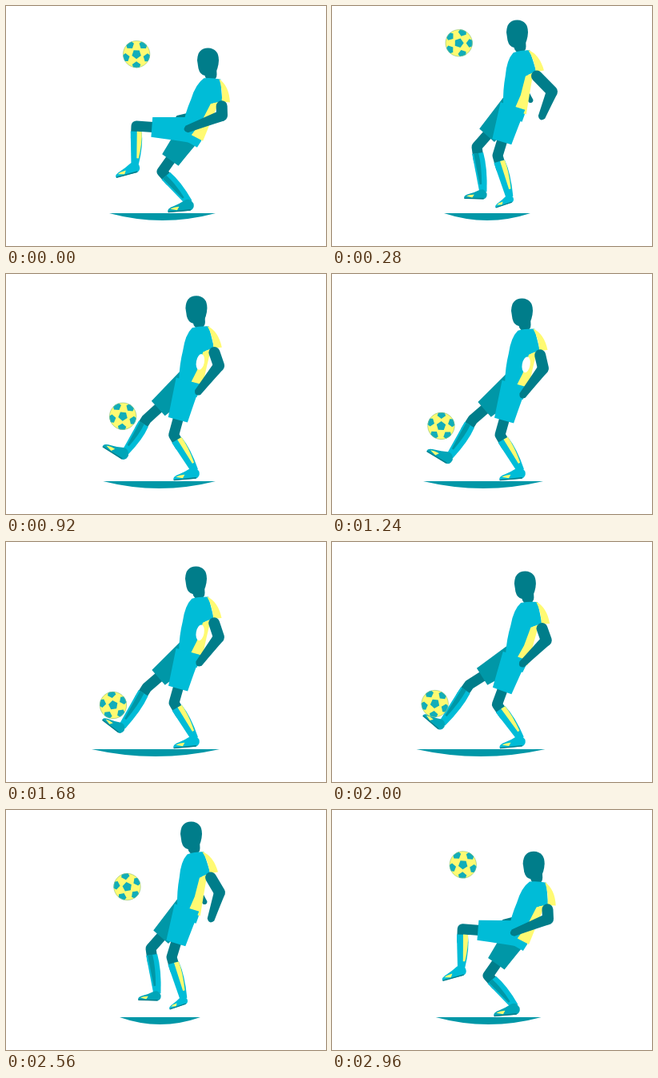
These frames come from a looping animation (400 by 300 pixels, 3000 ms). An HTML page:

```html
<!DOCTYPE html>
<html lang="en">
<head>
<meta charset="utf-8">
<title>Ball juggling</title>
<style>
  html, body { margin: 0; width: 100%; height: 100%; overflow: hidden; background: #fff; }
  svg { display: block; width: 100%; height: 100%; }
</style>
</head>
<body>
<svg id="stage" viewBox="0 0 400 300"></svg>
<script>
const CYAN = '#00bcd7', TEAL = '#0097a7', SKIN = '#007d8a', YELLOW = '#fffa72';
const FRAME = 40, FRAMES = 75;
const stage = document.getElementById('stage');

function add(tag, attrs, parent = stage) {
  const el = document.createElementNS('http://www.w3.org/2000/svg', tag);
  for (const key in attrs) el.setAttribute(key, attrs[key]);
  return parent.appendChild(el);
}
const shape = (fill, d = '', parent = stage) => add('path', { fill, d }, parent);
const bone = width => add('path', {
  fill: 'none', stroke: SKIN, 'stroke-width': width, 'stroke-linejoin': 'round', 'stroke-linecap': 'round'
});

// Joint order of every pose; the last pair is the left and right end of the shadow.
const JOINTS = ['waist', 'neck', 'elbow', 'hand', 'farHand', 'nearKnee', 'nearAnkle', 'nearToe',
  'farKnee', 'farAnkle', 'farToe', 'shadow'];
const pose = (...points) => Object.fromEntries(JOINTS.map((name, i) => [name, points[i]]));

const kneeUp = pose([232, 155], [256, 90], [270, 137], [226, 154], [214, 140],
  [163, 150], [161, 199], [137, 213], [195, 207], [229, 246], [202, 256], [129, 262]);
const airborne = pose([226, 122], [235, 52], [267, 103], [256, 137], [249, 116],
  [207, 184], [222, 236], [204, 248], [181, 173], [189, 230], [165, 236], [142, 243]);
const landing = pose([232, 155], [256, 89], [270, 136], [226, 153], [215, 140],
  [198, 210], [236, 246], [210, 256], [160, 164], [158, 215], [132, 223], [133, 259]);
const standing = pose([228, 137], [241, 68], [264, 118], [238, 152], [234, 125],
  [210, 201], [236, 246], [209, 256], [176, 182], [147, 228], [119, 220], [114, 264]);
const resting = { ...standing, elbow: [266, 119], hand: [241, 152],
  farAnkle: [145, 231], farToe: [121, 221], shadow: [107, 267] };
const kicking = pose([231, 157], [256, 91], [273, 134], [227, 156], [224, 142],
  [196, 209], [236, 246], [210, 256], [159, 168], [119, 212], [98, 197], [101, 265]);

const firstJump = Object.fromEntries(JOINTS.map(name =>
  [name, name === 'shadow' ? [140, 248] : [airborne[name][0], airborne[name][1] + 3]]));
firstJump.elbow = [275, 107];
firstJump.hand = [262, 139];
const stretching = { ...standing, waist: [228, 133], neck: [241, 64], elbow: [266, 114], hand: [240, 148],
  farAnkle: [149, 223], farToe: [121, 214], shadow: [121, 262] };
const reaching = { ...kicking, farAnkle: [117, 215], farToe: [95, 201] };
const kneeing = { ...kneeUp, waist: [231, 148], neck: [253, 82], elbow: [270, 130], hand: [229, 150],
  nearKnee: [165, 138], nearAnkle: [166, 189], nearToe: [143, 203], shadow: [135, 258] };

const KEYS = [[0, kneeUp], [7, firstJump], [14, landing], [24, stretching], [31, standing], [36, resting],
  [47, resting], [56, reaching], [57, kicking], [64, airborne], [70, kneeing], [75, kneeUp]];

// Ball contacts: frame, x, y, then the sideways and vertical curvature up to the next contact.
const BALL = [[-4.5, 166, 109, 0, 0.77], [19, 151, 198, 0, 0.55], [33, 134, 204, 0, 0], [47, 134, 204, 0, -0.15],
  [56, 118, 190, -0.135, 0.948], [70.5, 166, 109, 0, 0.77], [94, 151, 198, 0, 0]];

const mix = (a, b, k) => [a[0] + (b[0] - a[0]) * k, a[1] + (b[1] - a[1]) * k];
const shift = (p, n, k) => [p[0] + n[0] * k, p[1] + n[1] * k];
const num = p => p.map(v => v.toFixed(2)).join(' ');
const line = (...points) => 'M' + points.map(num).join('L');
const unit = (a, b) => {
  const length = Math.hypot(b[0] - a[0], b[1] - a[1]) || 1;
  return [(b[0] - a[0]) / length, (b[1] - a[1]) / length];
};
const rearOf = ([x, y]) => [y, -x];

// Tapered limb from a to b; bulge curves its rear edge outwards.
function limb(a, b, widthA, widthB, bulge = 0, tip = 0) {
  const along = unit(a, b), rear = rearOf(along);
  const belly = shift(mix(a, b, 0.4), rear, (widthA + widthB) / 4 + bulge);
  return 'M' + num(shift(a, rear, -widthA / 2)) + 'L' + num(shift(b, rear, -widthB / 2)) +
    'Q' + num(shift(b, along, tip)) + ' ' + num(shift(b, rear, widthB / 2)) +
    'Q' + num(belly) + ' ' + num(shift(a, rear, widthA / 2)) + 'Z';
}

function poseAt(frame) {
  const i = KEYS.findIndex(([start], n) => frame >= start && frame < KEYS[n + 1][0]);
  const [start, from] = KEYS[i], [end, to] = KEYS[i + 1];
  const k = (frame - start) / (end - start), eased = k * k * (3 - 2 * k);
  return Object.fromEntries(JOINTS.map(name => [name, mix(from[name], to[name], eased)]));
}

function ballAt(frame) {
  const i = BALL.findIndex(([start], n) => frame >= start && frame < BALL[n + 1][0]);
  const [start, x, y, curveX, curveY] = BALL[i], [end, nextX, nextY] = BALL[i + 1];
  const [px, py] = mix([x, y], [nextX, nextY], (frame - start) / (end - start));
  const bend = (frame - start) * (frame - end);
  return [px + curveX * bend, py + curveY * bend];
}

function makeLeg(side, shortsColor, stripeColor, shoeColor, stripeOffset) {
  const skin = bone(13), sock = shape(CYAN), stripe = shape(stripeColor);
  const shoe = add('g', {});
  shape(shoeColor, 'M-5 3Q-3-6 4-5Q13-3 20-3Q31-3 30 2L2 10Q-4 10-5 3Z', shoe);
  shape(SKIN, 'M30 1L30 2.5L2 10L1 8.5Z', shoe);
  shape(YELLOW, 'M14 0Q21-2 26-1L18 3.5Z', shoe);
  const shorts = shape(shortsColor);
  return p => {
    const hip = p.waist, knee = p[side + 'Knee'], ankle = p[side + 'Ankle'], toe = p[side + 'Toe'];
    const rear = rearOf(unit(knee, ankle)), top = mix(knee, ankle, 0.14);
    skin.setAttribute('d', line(mix(hip, knee, 0.5), knee, mix(knee, ankle, 0.3)));
    sock.setAttribute('d', limb(top, ankle, 14, 9, 4));
    stripe.setAttribute('d', limb(shift(top, rear, stripeOffset),
      shift(mix(knee, ankle, 0.82), rear, stripeOffset * 0.8), 6, 2.5, 2.5));
    const angle = Math.atan2(toe[1] - ankle[1], toe[0] - ankle[0]) * 180 / Math.PI;
    const size = Math.hypot(toe[0] - ankle[0], toe[1] - ankle[1]) / 30;
    shoe.setAttribute('transform', `translate(${num(ankle)}) rotate(${angle}) scale(${size} ${-size})`);
    shorts.setAttribute('d', limb(hip, mix(hip, knee, 0.72), 32, 25));
  };
}

const shadow = shape(TEAL);
const farArm = shape(SKIN);
const farLeg = makeLeg('far', TEAL, TEAL, '#00a5b8', -2);
const neck = bone(15);
const head = shape(SKIN, 'M-13.5-2Q-13-17.5 0-17.5Q13.5-17 13.5-2Q13 9 8 15Q3 18-4 17Q-10 16-12 8Z');
const torso = add('g', {});
shape(CYAN, 'M-8-66Q0-70 12-72L24-46L14-41L16 9L14 18L-10 14L-12 0Q-15-18-14-36Q-15-56-8-66Z', torso);
shape(YELLOW, 'M10-72Q25-68 33-49L23-46Q20-60 10-72Z', torso);
shape(YELLOW, 'M11-39L20-45L19-20L18 8L2 6L8-15Z', torso);
const gap = add('ellipse', { cx: 10, cy: -26, rx: 5, ry: 10, fill: '#fff' }, torso);
const nearLeg = makeLeg('near', CYAN, YELLOW, CYAN, 4);
const upperArm = bone(14), forearm = shape(SKIN);

const ball = add('g', {});
const clip = add('clipPath', { id: 'round' });
add('circle', { r: 17 }, clip);
const skinOfBall = add('g', { 'clip-path': 'url(#round)' }, ball);
add('circle', { r: 17, fill: YELLOW }, skinOfBall);
function pentagon(x, y, radius, turn) {
  const corners = [0, 1, 2, 3, 4].map(i => {
    const a = turn + i * Math.PI * 0.4;
    return [x + radius * Math.cos(a), y + radius * Math.sin(a)];
  });
  shape('#12adb9', line(...corners) + 'Z', skinOfBall);
}
pentagon(0, 0, 6, Math.PI / 2);
for (let i = 0; i < 5; i++) {
  const a = Math.PI / 2 + i * Math.PI * 0.4;
  pentagon(14.5 * Math.cos(a), 14.5 * Math.sin(a), 5.5, a + Math.PI);
}
add('circle', { r: 16.7, fill: 'none', stroke: '#8fc58c', 'stroke-width': 0.6 }, ball);

function draw(frame) {
  const p = poseAt(frame);
  const up = unit(p.waist, p.neck), right = [-up[1], up[0]];
  const onTorso = (x, y) => shift(shift(p.waist, right, x), up, y);

  const [left, end] = p.shadow;
  shadow.setAttribute('d', `M${left} 259H${end}Q${(left + end) / 2} 277 ${left} 259Z`);

  farArm.setAttribute('d', limb(onTorso(8, 25), p.farHand, 11, 6, 0, 4));
  farLeg(p);
  nearLeg(p);

  const face = shift(p.neck, [-3.5, -20], 1);
  head.setAttribute('transform', `translate(${num(face)})`);
  neck.setAttribute('d', line(shift(face, [3, 5], 1), shift(p.neck, [0, -4], 1)));
  const lean = Math.atan2(right[1], right[0]) * 180 / Math.PI;
  torso.setAttribute('transform', `translate(${num(p.waist)}) rotate(${lean})`);
  gap.setAttribute('visibility', frame > 22 && frame < 49 ? 'visible' : 'hidden');

  upperArm.setAttribute('d', line(onTorso(25, 41), p.elbow));
  forearm.setAttribute('d', limb(p.elbow, p.hand, 14, 9, 0, 7));

  const spot = ballAt(frame);
  ball.setAttribute('transform', `translate(${num(spot)}) rotate(${(spot[0] - 163) * 4})`);
}

function tick() {
  draw(Math.floor(performance.now() / FRAME) % FRAMES);
  requestAnimationFrame(tick);
}
tick();
</script>
</body>
</html>
```
